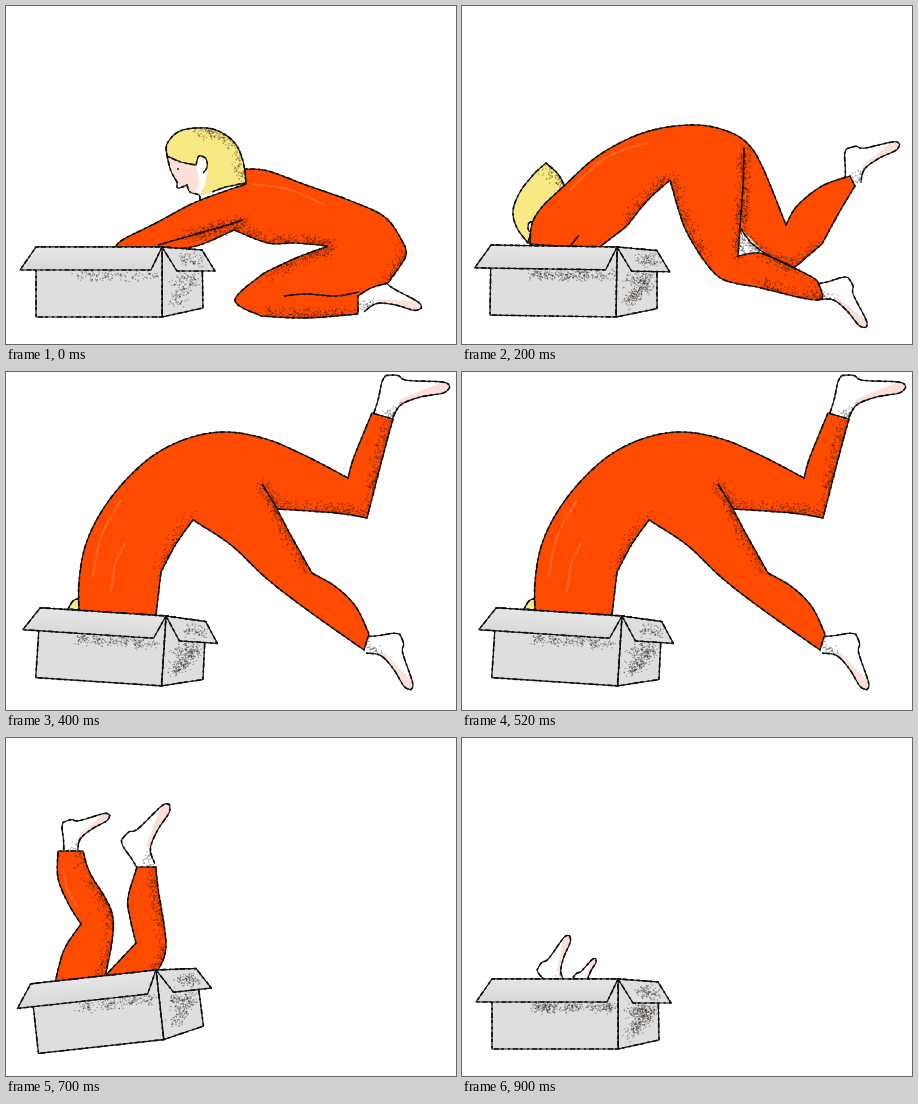
Animation of 450 by 338 pixels, one loop 1 s. Source, as an HTML page with a canvas:

```html
<!DOCTYPE html>
<html lang="en">
<head>
<meta charset="utf-8">
<title>Into the box</title>
<style>
html, body { margin: 0; width: 100%; height: 100%; overflow: hidden; background: #fff; }
canvas { display: block; }
</style>
</head>
<body>
<canvas id="stage" width="450" height="338"></canvas>
<script>
const ctx = document.getElementById('stage').getContext('2d');
const ORANGE = '#ff4b00', HAIR = '#f9e984', PINK = '#fddfd9', GREY = '#dedede';

let seed = 1;
function rnd() {
  seed = (seed * 16807) % 2147483647;
  return seed / 2147483647;
}

// Catmull-Rom curve through the key points, as a list of close points.
function spline(p) {
  const out = [];
  for (let i = 0; i < p.length - 1; i++) {
    const a = p[i - 1] || p[i], b = p[i], c = p[i + 1], d = p[i + 2] || c;
    for (let t = 0; t <= 1; t += 0.0625) {
      out.push([0, 1].map(k => b[k] + t / 2 * (c[k] - a[k]
        + t * (2 * a[k] - 5 * b[k] + 4 * c[k] - d[k])
        + t * t * (3 * b[k] - a[k] - 3 * c[k] + d[k]))));
    }
  }
  return out;
}

// "/" marks a sharp corner, "~" a run that carries charcoal shading.
function outline(text, closed) {
  const path = new Path2D(), shaded = [];
  let last = null;
  for (const run of text.split('/')) {
    const keys = run.replace('~', '').trim().split(/\s+/).map(s => s.split(',').map(Number));
    if (last) keys.unshift(last);
    else path.moveTo(...keys[0]);
    last = keys[keys.length - 1];
    const points = spline(keys);
    points.forEach(p => path.lineTo(...p));
    if (run.includes('~')) shaded.push(points);
  }
  if (closed) path.closePath();
  return { path, shaded };
}

function ink(path) {
  ctx.strokeStyle = '#111';
  ctx.lineJoin = 'round';
  ctx.lineWidth = 1.2;
  ctx.stroke(path);
  ctx.lineWidth = 1.7;
  ctx.setLineDash([3, 2, 5, 3, 2, 4]);
  ctx.stroke(path);
  ctx.setLineDash([]);
}

// Charcoal dust along a run of points, densest on the run itself.
function smudge(points, spread = 12, density = 5) {
  ctx.fillStyle = 'rgba(30,20,15,.4)';
  for (let i = 1; i < points.length; i++) {
    const [x, y] = points[i];
    const step = Math.hypot(x - points[i - 1][0], y - points[i - 1][1]);
    for (let n = step * density * 2 * rnd(); n > 0; n--) {
      ctx.fillRect(x + (rnd() - rnd()) * spread, y + (rnd() - rnd()) * spread, 1.2, 1.2);
    }
  }
}

function shape(colour, text, inked = true) {
  const { path, shaded } = outline(text, true);
  ctx.fillStyle = colour;
  ctx.fill(path);
  ctx.save();
  ctx.clip(path);
  shaded.forEach(points => smudge(points));
  ctx.restore();
  if (inked) ink(path);
}

function line(text) {
  const { path, shaded } = outline(text);
  shaded.forEach(points => smudge(points, 9));
  ink(path);
}

function shine(text) {
  ctx.strokeStyle = 'rgba(255,255,255,.15)';
  ctx.lineWidth = 2;
  ctx.stroke(outline(text).path);
}

// One foot, turned and scaled so that it reaches from the cuff to the toes.
function foot(x, y, toeX, toeY) {
  const reach = Math.hypot(69, 28), dx = toeX - x, dy = toeY - y;
  const scale = Math.hypot(dx, dy) / reach;
  const { path } = outline('-10,2 -4,-16 0,-34 4,-41/16,-41 26,-36 62,-34 69,-29/62,-23 39,-19 19,-11 10,4');
  const placed = new Path2D();
  placed.addPath(path, new DOMMatrix().translate(x, y)
    .rotate((Math.atan2(dy, dx) + Math.atan2(28, 69)) * 180 / Math.PI).scale(scale));
  ctx.fillStyle = '#fff';
  ctx.fill(placed);
  ctx.save();
  ctx.clip(placed);
  ctx.strokeStyle = PINK;
  ctx.lineWidth = 17 * scale;
  ctx.beginPath();
  ctx.moveTo(x + dx * 0.3, y + dy * 0.3);
  ctx.lineTo(toeX, toeY);
  ctx.stroke();
  smudge(spline([[x, y], [x + dx * 0.3, y + dy * 0.3]]), 8, 3);
  ctx.restore();
  ink(placed);
}

// The box hangs on its near top corner and rocks around it.
function box(x, y, tilt, grime = 1) {
  ctx.save();
  ctx.translate(x, y);
  ctx.rotate(tilt);
  shape(GREY, '0,0/40,3/41,61/0,70');
  smudge(spline([[11, 33], [31, 33], [11, 54]]), 9, 5 * grime);
  shape(GREY, '-126,0/0,0/0,70/-126,70');
  smudge(spline([[-88, 28], [-8, 28]]), 7, 3 * grime);
  const shade = ctx.createLinearGradient(0, 0, 0, 23);
  shade.addColorStop(0, '#e6e6e6');
  shade.addColorStop(1, '#d9d9d9');
  shape(shade, '-126,0/0,0/-11,23/-142,23');
  shape(GREY, '0,0/40,3/53,24/15,24');
  smudge(spline([[20, 11], [38, 14]]), 8, 4);
  ctx.restore();
}

function reach() {
  foot(352, 299, 415, 303);
  shape('#fff', '161,150 171,176/181,180 193,193/215,186/202,150', false);
  shape(PINK, '162,151 172,179/188,187/193,178 190,158', false);
  line('161,150 165,165 171,176/172,182 181,179/184,186 193,189 194,195');
  shape(ORANGE, `239,163 262,165 300,179 345,195 380,212 399,240/~399,252 382,277/365,282 352,290/
    352,308/~300,312 255,310/229,294 258,267/~290,252 322,240/~290,237 262,237 228,224/
    190,240 150,244 108,242/118,233 150,217 190,196 240,178`);
  line('152,239 180,231/~215,221 237,214');
  line('278,290 300,288 330,290 353,286');
  shine('245,178 285,184 320,200');
  shape(HAIR, `161,150 161,138 172,126 190,122/~210,124 228,136 237,155 240,177/220,181 194,190/
    202,163 193,150/190,159 175,156 161,150`, false);
  line('161,150 161,138 172,126 190,122 210,124 228,136 237,155 240,177/220,181 206,186');
  line('161,150 175,156 190,159/193,150 200,153 201,161 197,167');
  shape('#fff', '192,159 194,152 200,155 196,170 199,178 194,187', false);
  ctx.fillStyle = '#a33';
  ctx.fillRect(171, 162, 2, 2);
  box(156, 241, 0, 0.5);
}

function dive() {
  shape(HAIR, '66,237 55,222 51,205 58,186 72,168 84,157/~96,168 103,181/70,222');
  shape('#fff', '75,215 67,217 67,225 74,225');
  foot(390, 176, 438, 139);
  foot(356, 285, 403, 322);
  shape(ORANGE, `68,238 70,218 80,201 102,180 133,152 168,132 200,122 235,119 262,124 284,136 300,160 324,219/
    335,200 360,180 388,170/393,180/378,205 360,238/~332,262/350,271 356,276/~356,294 295,281/
    260,273 240,252/~222,220 208,174/~185,195 165,220/135,243`);
  shape('#fff', '279,223 304,248/290,247 276,250', false);
  line('~282,142 281,180 278,220 276,250/297,247 318,255 335,263');
  line('279,223 288,236/~304,248 332,262');
  line('109,239 117,229');
  shine('108,184 145,151 185,137');
  box(155, 241, 0.015);
}

function plunge() {
  shape(HAIR, '62,237 67,229 74,226/76,238');
  foot(376, 44, 444, 16);
  foot(360, 272, 404, 318);
  shape(ORANGE, `73,239 73,210 79,175 94,142 118,110 148,83 183,66 220,60 260,67 300,84 342,106/348,85 366,41/
    387,47/~378,80 361,146/~330,141 271,137/~283,160 306,201/330,215 350,235 363,262/358,278/
    300,237 260,206 225,173 187,148/~170,172 155,200/150,243`);
  line('256,112/~264,125 272,138');
  shine('87,205 95,165 115,128');
  shine('105,220 110,190 120,170');
  box(160, 244, 0.065);
}

function tumble() {
  foot(127, 58, 141, 2);
  foot(269, 107, 318, 136);
  shape(ORANGE, `63,240 60,215 56,180 58,152 68,137 90,126 125,117 167,108/150,90 118,62/135,51/
    ~160,67 200,100/206,114 205,123/230,106 265,96/275,116/~245,140 213,161/180,173 130,182/
    ~138,190 143,238`);
  line('122,122 160,125 192,131 206,118');
  line('130,182 119,183');
  shine('70,195 78,160 92,145');
  box(151, 234, -0.05);
}

function kick() {
  foot(64, 113, 104, 78);
  foot(140, 130, 164, 67);
  shape(ORANGE, '99,238 130,205/124,180 122,160 131,129/150,129/~152,150 160,208 150,236');
  shape(ORANGE, '49,245 58,212 75,186/62,165 52,140 52,113/77,113/~84,135 107,180 99,240');
  shine('57,130 61,150 70,168');
  box(150, 232, -0.11);
}

function sink() {
  foot(62, 185, 83, 124);
  foot(144, 199, 189, 202);
  shape(ORANGE, '78,246 52,205 51,185/73,182/~85,210 112,243');
  shape(ORANGE, '117,244 120,215 133,192/155,203/~148,220 144,243');
  box(150, 240, -0.055, 1.5);
}

function vanish() {
  foot(98, 250, 108, 198);
  foot(124, 252, 134, 221);
  box(156, 241, 0, 1.5);
}

const poses = [[0, reach], [200, dive], [400, plunge], [600, tumble], [700, kick], [800, sink], [900, vanish]];
let shown = null;

function tick() {
  const time = performance.now() % 1000;
  const [start, draw] = poses.filter(pose => pose[0] <= time).pop();
  if (draw !== shown) {
    shown = draw;
    seed = 4211 + start;
    ctx.fillStyle = '#fff';
    ctx.fillRect(0, 0, 450, 338);
    draw();
  }
  requestAnimationFrame(tick);
}
tick();
</script>
</body>
</html>
```
